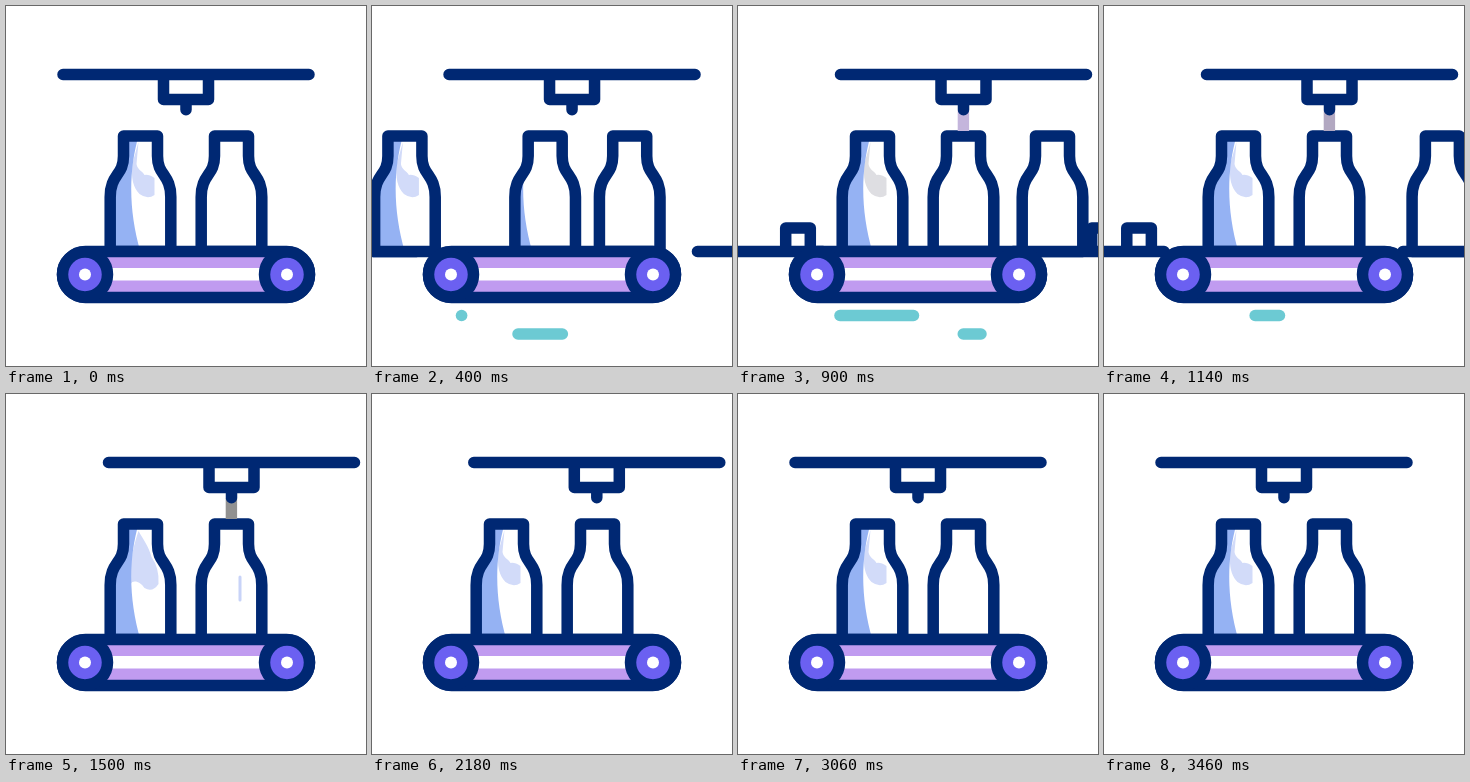
An HTML page for the animation above (3600 ms loop, 360 by 360 pixels).

```html
<!DOCTYPE html>
<html lang="en">
<head>
<meta charset="utf-8">
<title>Bottling line</title>
<style>
html, body { margin: 0; width: 100%; height: 100%; overflow: hidden; background: #fff; }
svg { display: block; width: 100vw; height: 100vh; }
.line { fill: none; stroke: #002873; stroke-width: 11.5; stroke-linecap: round; stroke-linejoin: round; }
.teal { stroke: #6ccad3; }
</style>
</head>
<body>
<svg viewBox="0 0 360 360">
  <defs>
    <path id="glass" d="M-30.3 245.5V191C-30.3 168-17 170-17 150V130H17V150C17 170 30.3 168 30.3 191V245.5Z"/>
    <clipPath id="inside"><use href="#glass"/></clipPath>
    <g id="wheel">
      <circle r="22.5" class="line" style="fill:#6b60f1"/>
      <circle r="6" fill="#fff"/>
    </g>
  </defs>

  <path id="dash1" class="line teal"/>
  <path id="dash2" class="line teal"/>

  <g id="benchL"><path class="line" d="M-120 245.5H85M47.7 245V222H72.3V245"/></g>
  <g id="benchR"><path class="line" d="M275 245.5H500M353.7 245V222H378.3V245"/></g>

  <g id="bottles"></g>

  <rect x="56.5" y="245.5" width="247" height="46" rx="23" fill="#c09bf0"/>
  <rect x="79" y="262" width="202" height="12.5" fill="#fff"/>
  <rect x="56.5" y="245.5" width="247" height="46" rx="23" class="line"/>
  <use href="#wheel" x="79" y="268.5"/>
  <use href="#wheel" x="281" y="268.5"/>

  <rect id="stream" x="219.7" width="11.4"/>
  <g id="arm">
    <path class="line" d="M157.5 69V93.5H202.5V69" style="fill:#fff"/>
    <path class="line" d="M57 68.5H303M180 97V103.7"/>
  </g>
</svg>
<script>
const LOOP = 3600;
const $ = id => document.getElementById(id);
const clamp = v => Math.min(1, Math.max(0, v));
const span = (t, a, b) => clamp((t - a) / (b - a));
const mix = (a, b, k) => a + (b - a) * k;
const smooth = k => k * k * (3 - 2 * k);
const easeOut = k => 1 - (1 - k) * (1 - k);
const shift = (el, x) => el.setAttribute("transform", `translate(${x.toFixed(2)} 0)`);
const show = (el, on) => el.setAttribute("visibility", on ? "visible" : "hidden");

const SHINE_REST = "M-2 136L-8 157C-10 172-7 182-1 188Q7 194 14 189V172Q8 168 4 169C1 164-3 164-4 158Z";
const SHINE_FULL = "M-2 137C3 146 8 152 11 163Q19 174 18 190Q12 199 4 194C0 188-7 185-10 190C-11 172-9 158-2 137Z";

function makeBottle() {
  const g = document.createElementNS("http://www.w3.org/2000/svg", "g");
  g.innerHTML = `<use href="#glass" fill="#fff"/>
    <g clip-path="url(#inside)">
      <path class="shine" fill="#d2dbf9"/>
      <path class="shade" fill="#95b2f3" d="M-40 130H-2C-12 165-12 205 0 246H-40Z"/>
      <path class="glint" d="M8.5 183V206" stroke="#c8d3f8" stroke-width="3" stroke-linecap="round"/>
    </g>
    <use href="#glass" class="line"/>`;
  $("bottles").append(g);
  const part = name => g.querySelector("." + name);
  return { g, shine: part("shine"), shade: part("shade"), glint: part("glint") };
}

const [fresh, middle, last] = [0, 1, 2].map(makeBottle);
show(last.shade, false);
for (const b of [middle, last]) show(b.shine, false);
for (const b of [fresh, last]) show(b.glint, false);

function dash(el, x1, x2, y, on) {
  el.setAttribute("d", `M${x1.toFixed(2)} ${y}H${x2.toFixed(2)}`);
  show(el, on);
}

function draw(t) {
  const leave = smooth(span(t, 1000, 1420));

  // head follows the bottle, then returns
  shift($("arm"), 45.5 * (span(t, 172, 692) - span(t, 2170, 2880)));

  // bottles advance one place
  const step = span(t, 180, 700);
  shift(fresh.g, mix(-59, 134.5, span(t, 163, 664)));
  shift(middle.g, mix(134.5, 225.5, step));
  shift(last.g, 225.5 + 89 * span(t, 182, 787) + 91 * leave);
  shift(middle.shade, -30 * step);
  show(middle.shade, step < 1);
  show(last.g, leave < 1);
  show(middle.glint, t > 1400 && t < 1780);

  // pale reflection on the filled bottle
  const resting = t < 180 || t > 1880;
  const host = t < 180 ? middle : fresh;
  show(middle.shine, t < 180);
  show(fresh.shine, t >= 180 && (t < 480 || t > 700));
  host.shine.setAttribute("d", resting || t < 1200 ? SHINE_REST : SHINE_FULL);
  host.shine.setAttribute("fill", t > 760 && t < 1100 ? "#dedee2" : "#d2dbf9");

  // side benches slide in and out
  shift($("benchL"), -95 * (1 - easeOut(span(t, 160, 853)) + leave));
  shift($("benchR"), 91 * (1 - easeOut(span(t, 318, 643)) + leave));
  show($("benchL"), t > 160 && leave < 1);
  show($("benchR"), t > 318 && leave < 1);

  // floor dashes
  const grow = Math.pow(span(t, 395, 815), 1.5);
  dash($("dash1"), mix(89.5, 175.5, span(t, 840, 1260)), 89.5 + 86 * grow, 309.5, t >= 395 && t < 1260);
  dash($("dash2"), mix(146, 243, span(t, 570, 975)), mix(146, 243, span(t, 219, 617)), 328, t >= 219 && t < 975);

  // poured stream
  const top = mix(104, 125, span(t, 1780, 1880));
  const bottom = mix(104, 125, span(t, 700, 800));
  const k = smooth(span(t, 900, 1500));
  const tone = [[196, 181, 220], [145, 145, 145]];
  const rgb = tone[0].map((c, i) => Math.round(mix(c, tone[1][i], k)));
  const s = $("stream");
  s.setAttribute("y", top);
  s.setAttribute("height", Math.max(0, bottom - top));
  s.setAttribute("fill", `rgb(${rgb})`);
}

const start = performance.now();
function tick() {
  draw((performance.now() - start) % LOOP);
  requestAnimationFrame(tick);
}
draw(0);
requestAnimationFrame(tick);
</script>
</body>
</html>
```
